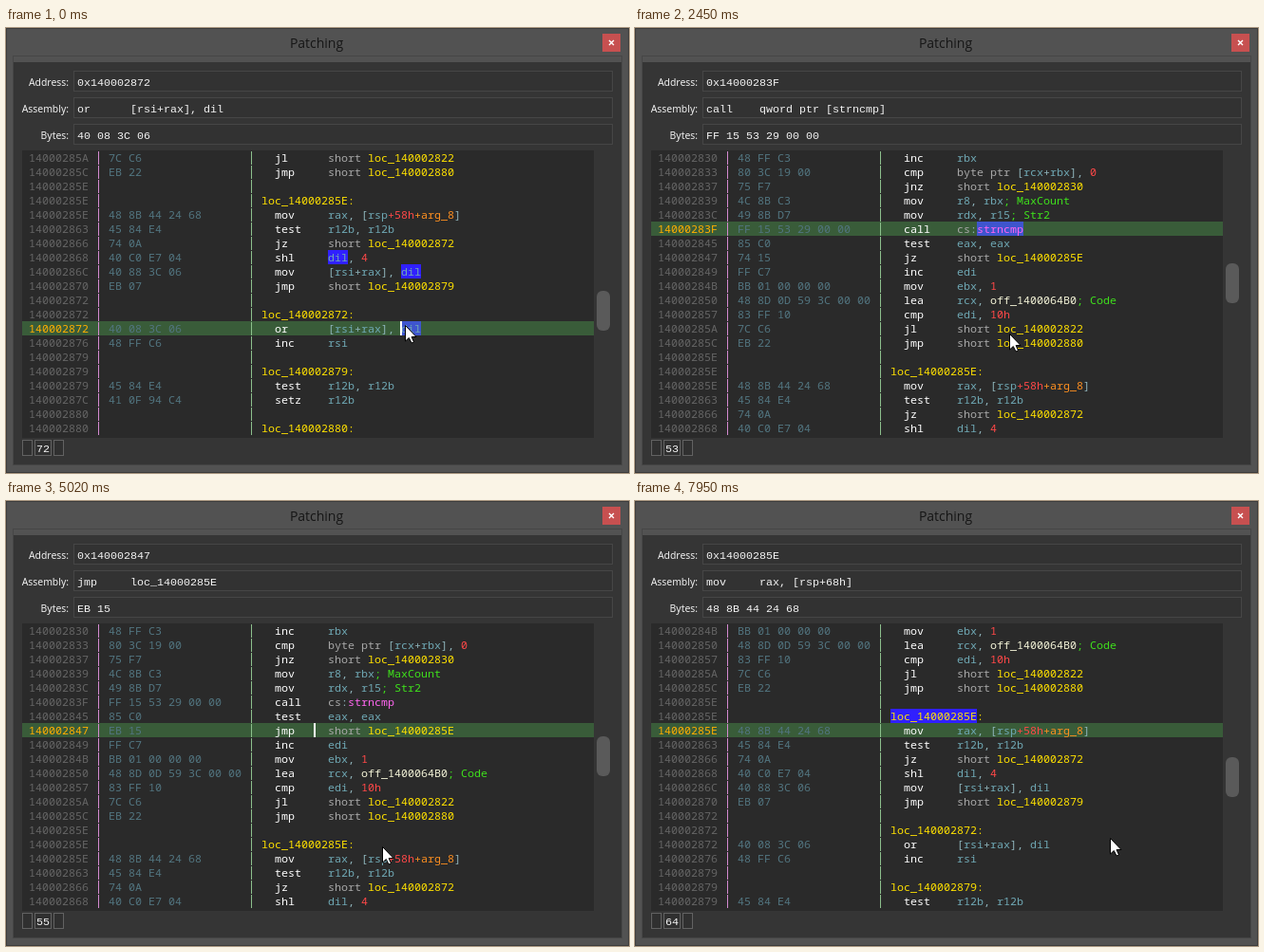
An HTML page with a canvas that plays this animation: 656x469 px, repeating every 8 s.

```html
<!DOCTYPE html>
<html lang="en">
<head>
<meta charset="utf-8">
<title>Patching</title>
<style>
html, body { margin: 0; width: 100%; height: 100%; overflow: hidden; background: #525252; }
canvas { display: block; }
</style>
</head>
<body>
<canvas id="stage" width="656" height="469"></canvas>
<script>
const ctx = document.getElementById('stage').getContext('2d');
const LOOP = 8000, CHAR = 7, ROW = 15, LEFT = 17, TOP = 129, WIDTH = 602, VISIBLE = 20;
const CODE_FONT = '11.667px "Noto Sans Mono", monospace';
const FIELD_FONT = '11.667px "Liberation Mono", monospace';
const LABEL_FONT = '10.4px "Noto Sans", sans-serif';

// Last two address digits | bytes | instruction or label
const listing = `30|48 FF C3|inc rbx
33|80 3C 19 00|cmp byte ptr [rcx+rbx], 0
37|75 F7|jnz short loc_140002830
39|4C 8B C3|mov r8, rbx; MaxCount
3C|49 8B D7|mov rdx, r15; Str2
3F|FF 15 53 29 00 00|call cs:strncmp
45|85 C0|test eax, eax
47|74 15|jz short loc_14000285E
49|FF C7|inc edi
4B|BB 01 00 00 00|mov ebx, 1
50|48 8D 0D 59 3C 00 00|lea rcx, off_1400064B0; Code
57|83 FF 10|cmp edi, 10h
5A|7C C6|jl short loc_140002822
5C|EB 22|jmp short loc_140002880
5E||
5E||loc_14000285E:
5E|48 8B 44 24 68|mov rax, [rsp+58h+arg_8]
63|45 84 E4|test r12b, r12b
66|74 0A|jz short loc_140002872
68|40 C0 E7 04|shl dil, 4
6C|40 88 3C 06|mov [rsi+rax], dil
70|EB 07|jmp short loc_140002879
72||
72||loc_140002872:
72|40 08 3C 06|or [rsi+rax], dil
76|48 FF C6|inc rsi
79||
79||loc_140002879:
79|45 84 E4|test r12b, r12b
7C|41 0F 94 C4|setz r12b
80||
80||loc_140002880:`.split('\n').map(line => {
  const [low, bytes, code] = line.split('|');
  const [, mnemonic, operands] = bytes ? code.match(/(\w+) (.*)/) : [, '', ''];
  return { address: '1400028' + low, bytes, mnemonic, operands, label: bytes ? '' : code };
});
const PATCHED = 7, PATCH_TIME = 4880;
const patchedRow = { ...listing[PATCHED], bytes: 'EB 15', mnemonic: 'jmp' };

const tokenColors = [
  [/^;/, '#3fe01c'],
  [/^loc_/, '#ffe100'],
  [/^off_/, '#f4f4d8'],
  [/^strncmp/, '#ff66f0'],
  [/^\+?arg/, '#ff9020'],
  [/^(\+58h|\d)/, '#ff4848'],
  [/^(short|byte|ptr|cs)/, '#a8a8a8'],
  [/^\w/, '#6fa8b4'],
];
const tokenPattern = /;.*|\+58h|\+arg_8|\w+|[^\w;]/g;

// [time, value] steps
const scrollSteps = [[0, 12], [210, 9], [305, 6], [400, 3], [870, 0], [6800, 3], [6930, 6], [7400, 9]];
const cursorLine = [[0, 12], [1600, 5], [3050, 7], [5150, 8], [6070, 7]];
const caretColumn = [[0, 56], [1600, 51], [3050, 39], [3930, 43], [5150, -1], [6070, 62]];
const markedWord = [[0, 'dil'], [1600, 'strncmp'], [3050, ''], [6070, 'loc_14000285E']];
const clicks = [-100, 1600, 3050, 3930, 6070];
const BLINK = 485, PRESS = 200;

// [time, x, y] of the pointer tip
const pointerPath = [
  [0, 420, 313], [610, 420, 313], [730, 409, 270], [1000, 409, 270], [1460, 379, 202], [1600, 379, 210],
  [2150, 379, 210], [2390, 416, 300], [2570, 350, 366], [2760, 278, 300], [2920, 292, 246], [3050, 294, 243],
  [3200, 294, 243], [3570, 335, 252], [3780, 335, 252], [3930, 328, 243], [4130, 328, 243], [4410, 443, 296],
  [4680, 443, 296], [5010, 396, 364], [5490, 396, 364], [5930, 455, 245], [6200, 455, 245], [6530, 548, 371],
  [7680, 548, 371], [7950, 500, 355],
];

const stepAt = (steps, t) => steps.filter(s => s[0] <= t).pop()[1];

function pointerAt(t) {
  const next = pointerPath.findIndex(p => p[0] > t);
  if (next < 0) return pointerPath[pointerPath.length - 1].slice(1);
  const [t0, x0, y0] = pointerPath[next - 1], [t1, x1, y1] = pointerPath[next];
  const k = (t - t0) / (t1 - t0);
  return [Math.round(x0 + (x1 - x0) * k), Math.round(y0 + (y1 - y0) * k)];
}

function rect(x, y, w, h, color) {
  ctx.fillStyle = color;
  ctx.fillRect(x, y, w, h);
}

function box(x, y, w, h, fill, border) {
  rect(x, y, w, h, border);
  rect(x + 1, y + 1, w - 2, h - 2, fill);
}

function text(str, x, y, color, font, align = 'left') {
  ctx.font = font;
  ctx.textAlign = align;
  ctx.fillStyle = color;
  ctx.fillText(str, x, y);
}

// Monospaced text placed on the character grid
function gridText(str, x, y, color, font) {
  [...str].forEach((c, i) => c !== ' ' && text(c, x + i * CHAR, y, color, font));
}

const columnX = column => 24 + column * CHAR;

function tokens(row) {
  const list = [];
  let column = row.label ? 35 : 45;
  for (const str of (row.label || row.operands).match(tokenPattern) || []) {
    const rule = tokenColors.find(([pattern]) => pattern.test(str));
    list.push({ str, column, color: rule ? rule[1] : row.label ? '#ffe100' : '#8fb4bb' });
    column += str.length;
  }
  return list;
}

function assembly(row) {
  const operands = row.operands.replace(/;.*|short /g, '')
    .replace('cs:strncmp', 'qword ptr [strncmp]')
    .replace(/off_\w+/, 'qword ptr [$&]')
    .replace('58h+arg_8', '68h');
  return row.mnemonic.padEnd(8) + operands;
}

function drawWindow() {
  rect(0, 0, 656, 469, '#525252');
  ctx.lineWidth = 1;
  ctx.strokeStyle = '#3c3c3c';
  ctx.strokeRect(0.5, 0.5, 655, 468);
  ctx.strokeStyle = '#464646';
  ctx.strokeRect(7.5, 29.5, 641, 431);
  rect(8, 36, 640, 424, '#353535');
  text('Patching', 327, 21, '#161616', '14px "Open Sans", sans-serif', 'center');
  rect(628, 6, 19, 19, '#c75050');
  ctx.strokeStyle = '#fff';
  ctx.lineWidth = 1.4;
  ctx.beginPath();
  for (const d of [-1, 1]) {
    ctx.moveTo(637.5 - 2.5, 15.5 - 2.5 * d);
    ctx.lineTo(637.5 + 2.5, 15.5 + 2.5 * d);
  }
  ctx.stroke();
}

function drawFields(row) {
  const source = row.bytes ? row : listing.find(r => r.address === row.address && r.bytes) || row;
  const fields = [['Address:', '0x' + row.address], ['Assembly:', assembly(source)], ['Bytes:', source.bytes]];
  fields.forEach(([label, value], i) => {
    const y = 45 + i * 28;
    box(71, y, 568, 22, '#323232', '#464646');
    text(label, 66, y + 16, '#f0f0f0', LABEL_FONT, 'right');
    gridText(value, 75, y + 16, '#f4f4f4', FIELD_FONT);
  });
}

function drawRow(row, y, isCurrent, isPatched, word) {
  const parts = tokens(row), baseline = y + 12;
  for (const p of parts) {
    if (p.str === word) rect(columnX(p.column), y, p.str.length * CHAR, ROW, '#3020ff');
  }
  if (isCurrent) rect(LEFT, y, WIDTH, ROW, 'rgba(92,209,92,.3)');
  else if (isPatched) rect(LEFT, y, WIDTH, ROW, 'rgba(210,210,115,.3)');
  gridText(row.address, columnX(0), baseline, isCurrent ? '#ffae00' : '#656565', CODE_FONT);
  rect(97, y + 1, 1, 14, '#d48ad0');
  gridText(row.bytes, columnX(12), baseline, '#527580', CODE_FONT);
  rect(258, y + 1, 1, 14, '#8cc08c');
  gridText(row.mnemonic, columnX(37), baseline, '#fff', CODE_FONT);
  for (const p of parts) gridText(p.str, columnX(p.column), baseline, p.color, CODE_FONT);
}

function drawPointer(t) {
  const [x, y] = pointerAt(t);
  if (clicks.some(c => c >= 0 && t >= c && t < c + PRESS)) {
    ctx.fillStyle = 'rgba(230,210,0,.6)';
    ctx.beginPath();
    ctx.arc(x, y, 12, 0, 7);
    ctx.fill();
  }
  ctx.save();
  ctx.translate(x + 0.5, y + 0.5);
  const arrow = new Path2D('M0 0V16.5L3.8 13L6.5 18.5L9 17.5L6.6 12H11.5Z');
  ctx.fillStyle = '#fff';
  ctx.strokeStyle = '#000';
  ctx.lineWidth = 1;
  ctx.fill(arrow);
  ctx.stroke(arrow);
  ctx.restore();
}

function draw(t) {
  const top = stepAt(scrollSteps, t), line = stepAt(cursorLine, t), current = top + line;
  const word = stepAt(markedWord, t), column = stepAt(caretColumn, t);
  const patched = t >= PATCH_TIME;
  const rowAt = i => patched && i === PATCHED ? patchedRow : listing[i];

  drawWindow();
  drawFields(rowAt(current));

  rect(LEFT, TOP, WIDTH, 303, '#2a2a2a');
  for (let i = 0; i < VISIBLE; i++) {
    const index = top + i;
    drawRow(rowAt(index), TOP + i * ROW, i === line, patched && index === PATCHED, word);
  }
  const lastClick = clicks.filter(c => c <= t).pop();
  if (column >= 0 && Math.floor((t - lastClick) / BLINK) % 2 === 0) {
    rect(columnX(column) - 1, TOP + line * ROW, 2, ROW, '#fff');
  }

  ctx.fillStyle = '#5a5a5a';
  ctx.beginPath();
  ctx.roundRect(622, Math.round(248 + top * 2.43), 14, 42, 6);
  ctx.fill();

  for (const [x, w] of [[17, 11], [30, 18], [50, 11]]) box(x, 434, w, 17, '#303030', '#626262');
  gridText(String(current + 48), 32, 447, '#f4f4f4', FIELD_FONT);

  drawPointer(t);
}

function frame() {
  draw(performance.now() % LOOP);
  requestAnimationFrame(frame);
}
frame();
</script>
</body>
</html>
```
